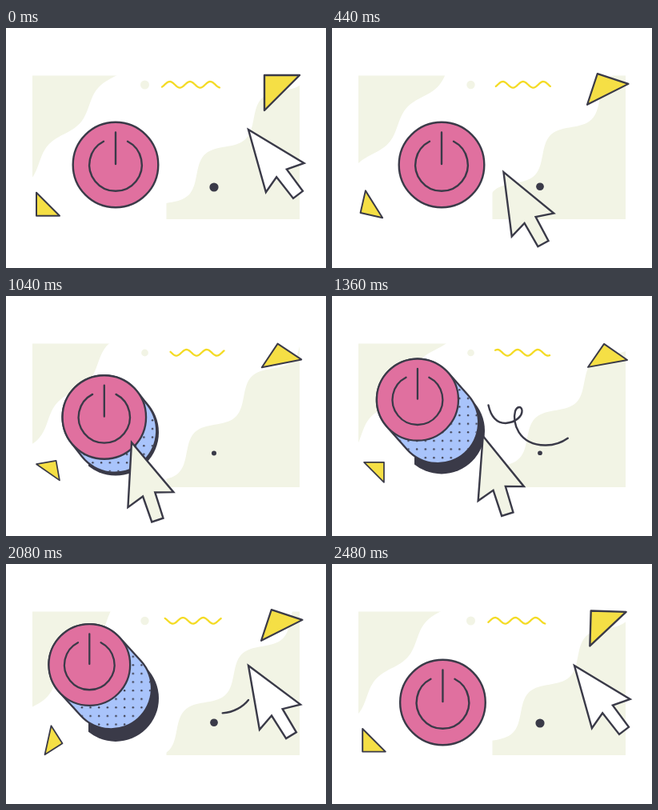
These frames come from a looping animation (400x300 px, 2520 ms). An HTML page:

```html
<!DOCTYPE html>
<html lang="en">
<head>
<meta charset="utf-8">
<title>Power button</title>
<style>
  html, body { margin: 0; width: 100%; height: 100%; overflow: hidden; background: #fff; }
  svg { display: block; width: 100%; height: 100%; }
  .ink { stroke: #3a3a48; stroke-width: 2.4; }
  .line { fill: none; stroke-linecap: round; }
  .tri { fill: #f5df45; stroke-linejoin: round; }
</style>
</head>
<body>
<svg viewBox="0 0 400 300">
  <defs>
    <clipPath id="leftBox"><rect x="33" y="59.5" width="160" height="179.5"/></clipPath>
    <clipPath id="rightBox"><rect x="200.5" y="59.5" width="166.5" height="179.5"/></clipPath>
    <clipPath id="cut"><rect x="103" y="60" width="120" height="200"/></clipPath>
    <pattern id="dots" width="10.65" height="10.6" patternUnits="userSpaceOnUse">
      <circle cx="5" cy="5" r="1.2" fill="#3a3a48"/>
    </pattern>
  </defs>
  <g fill="#f2f4e5">
    <path id="left" clip-path="url(#leftBox)"/>
    <path id="right" clip-path="url(#rightBox)"/>
    <circle id="pale" cx="173.5" cy="71"/>
  </g>
  <path id="wave" class="line" stroke="#f4db25" stroke-width="2.3"/>
  <path id="bigTri" class="ink tri" d="M-22 -22H22L-22 22Z"/>
  <path id="smallTri" class="ink tri" style="stroke-width: 2" d="M-14.5 -14.5V14.5H14.5Z"/>
  <g id="tube">
    <g clip-path="url(#cut)"><circle id="shade" cx="137" r="54" fill="#3a3a48"/></g>
    <line id="rim" class="line" stroke="#3a3a48"/>
    <line id="body" class="line" stroke="#a9c4fb"/>
    <line id="spots" class="line" stroke="url(#dots)"/>
  </g>
  <g id="button" class="ink line">
    <circle r="53.3" fill="#e0709f"/>
    <path d="M-15 -29.2A32.8 32.8 0 1 0 15 -29.2M0 -40.5V-1"/>
  </g>
  <path id="trail" class="ink line" pathLength="1"
    d="M195.5 136.5C199 152 206 159 217 159C230 158 238 150 237.5 143C237 137 231 138 229 144C225 158 233 186 266 186.5C282 187 296 179 303 170"/>
  <circle id="dot" cx="260" fill="#3a3a48"/>
  <path id="arrow" class="ink" d="M0 0L30 75.5L8 68.5L7.5 102.3H-7.5L-8 68.5L-30 75.5Z"/>
</svg>
<script>
const LOOP = 2520, STEP = 40, TAU = 2 * Math.PI;
const el = {};
document.querySelectorAll('svg [id]').forEach(n => el[n.id] = n);

const set = (node, attrs) => {
  for (const k in attrs) node.setAttribute(k, attrs[k]);
};
const ramp = (t, from, to) => Math.min(1, Math.max(0, (t - from) / (to - from)));
const smooth = u => u * u * (3 - 2 * u);
const ease = (t, from, to) => smooth(ramp(t, from, to));
const hump = (t, from, to) => Math.sin(Math.PI * ramp(t, from, to));

// Ripple running along the straight line a-b; two waves pass per loop.
function ripple(t, [ax, ay], [bx, by], { mid, amp, len, dip, dir }) {
  const size = Math.hypot(bx - ax, by - ay);
  const dx = (bx - ax) / size, dy = (by - ay) / size;
  const shift = dip + dir * 2 * len * t / LOOP;
  const pts = [];
  for (let s = -20; s < size + 30; s += 3) {
    const n = mid - amp * Math.cos((s - shift) / len * TAU);
    pts.push([ax + dx * s + dy * n, ay + dy * s - dx * n]);
  }
  return 'M' + pts.join('L');
}

function drawBack(t) {
  const a = ripple(t, [136, 60], [33, 178], { mid: 0, amp: 6, len: 95, dip: 25, dir: 1 });
  const b = ripple(t, [367, 62], [201, 225], { mid: -3.5, amp: 11, len: 100, dip: 152, dir: -1 });
  set(el.left, { d: a + 'L0 0Z' });
  set(el.right, { d: b + 'V300H400Z' });

  const c = Math.cos(TAU * t / LOOP);
  set(el.pale, { r: 4.9 + .6 * c });
  set(el.dot, { r: 4.2 + 1.4 * c, cy: 197.6 + 1.4 * c });
}

function drawWave(t) {
  const slide = Math.sin(Math.PI * (t / LOOP) ** .6);
  const len = 25.3, shift = 204.7 + 2 * len * t / LOOP;
  const pts = [];
  for (let x = 195 + 11 * slide; x <= 267 + 6.7 * slide; x++)
    pts.push([x, 70.8 - 3.8 * Math.cos((x - shift) / len * TAU)]);
  set(el.wave, { d: 'M' + pts.join('L') });
}

function drawTriangles(t) {
  const s = Math.sin(Math.PI * t / LOOP);
  set(el.bigTri, {
    transform: `translate(${345 - .5 * s} ${81 + 3.5 * s}) rotate(${35 * s}) scale(${1 - .2 * s ** 1.5})`
  });
  const turn = 180 * (ramp(t, 0, 1060) ** 3 + ramp(t, 1260, 2460) ** 3);
  const size = 1 - .14 * (ramp(t, 0, 1040) ** 2 - ramp(t, 1260, LOOP) ** 3);
  set(el.smallTri, { transform: `translate(52.5 220.3) rotate(${turn}) scale(${size})` });
}

function drawButton(t) {
  const up = Math.sin(Math.PI / 2 * ramp(t, 840, 1540)) * (1 - ease(t, 2160, 2420));
  const k = up - .045 * hump(t, 2430, LOOP);
  const size = 1 - .046 * up;
  const x = 137 - 32.7 * k, y = 171 - 45 * k;
  const bx = -5.8 * up ** 2.2, by = -15.5 * up ** 2.2;
  set(el.button, { transform: `translate(${x} ${y}) scale(${size})` });
  set(el.tube, { visibility: up > .01 ? 'visible' : 'hidden' });

  const wide = 106.6 * size;
  const ends = { x1: x, y1: y, x2: 137 + bx, y2: 171 + by };
  set(el.rim, { ...ends, 'stroke-width': wide + 2.4 });
  set(el.body, { ...ends, 'stroke-width': wide - 2.4 });
  set(el.spots, { ...ends, 'stroke-width': wide - 2.4 });
  set(el.shade, { cy: 171 + .2 * by });
  set(el.dots, { patternTransform: `translate(${136 + .6 * bx} ${183.6 + .6 * by})` });
}

function drawTrail(t) {
  const a = ease(t, 1640, 2260), b = ramp(t, 1060, 1380);
  set(el.trail, {
    visibility: b - a > .005 ? 'visible' : 'hidden',
    'stroke-dasharray': `${b - a} 2`,
    'stroke-dashoffset': -a
  });
}

function drawArrow(t) {
  const go = ease(t, 120, 680) - ease(t, 1050, 2080) - .035 * hump(t, 0, 240);
  const sag = (t < 900 ? 80 : 25) * go * (1 - go);
  const swing = 1 - (1 - ramp(t, 170, 1300)) ** 2 - ease(t, 1500, 2400);
  const tint = ramp(t, 100, 400) - ramp(t, 1800, 2060);
  const mix = v => Math.round(255 + (v - 255) * tint);
  set(el.arrow, {
    transform: `translate(${303 - 146 * go} ${127 + 56 * go + sag}) rotate(${19.9 * swing - 37.3})`,
    fill: `rgb(${[242, 244, 229].map(mix)})`
  });
}

function draw(t) {
  drawBack(t);
  drawWave(t);
  drawTriangles(t);
  drawButton(t);
  drawTrail(t);
  drawArrow(t);
}

let start;
function tick(now) {
  if (start === undefined) start = now;
  draw(Math.floor((now - start) % LOOP / STEP) * STEP);
  requestAnimationFrame(tick);
}
draw(0);
requestAnimationFrame(tick);
</script>
</body>
</html>
```
